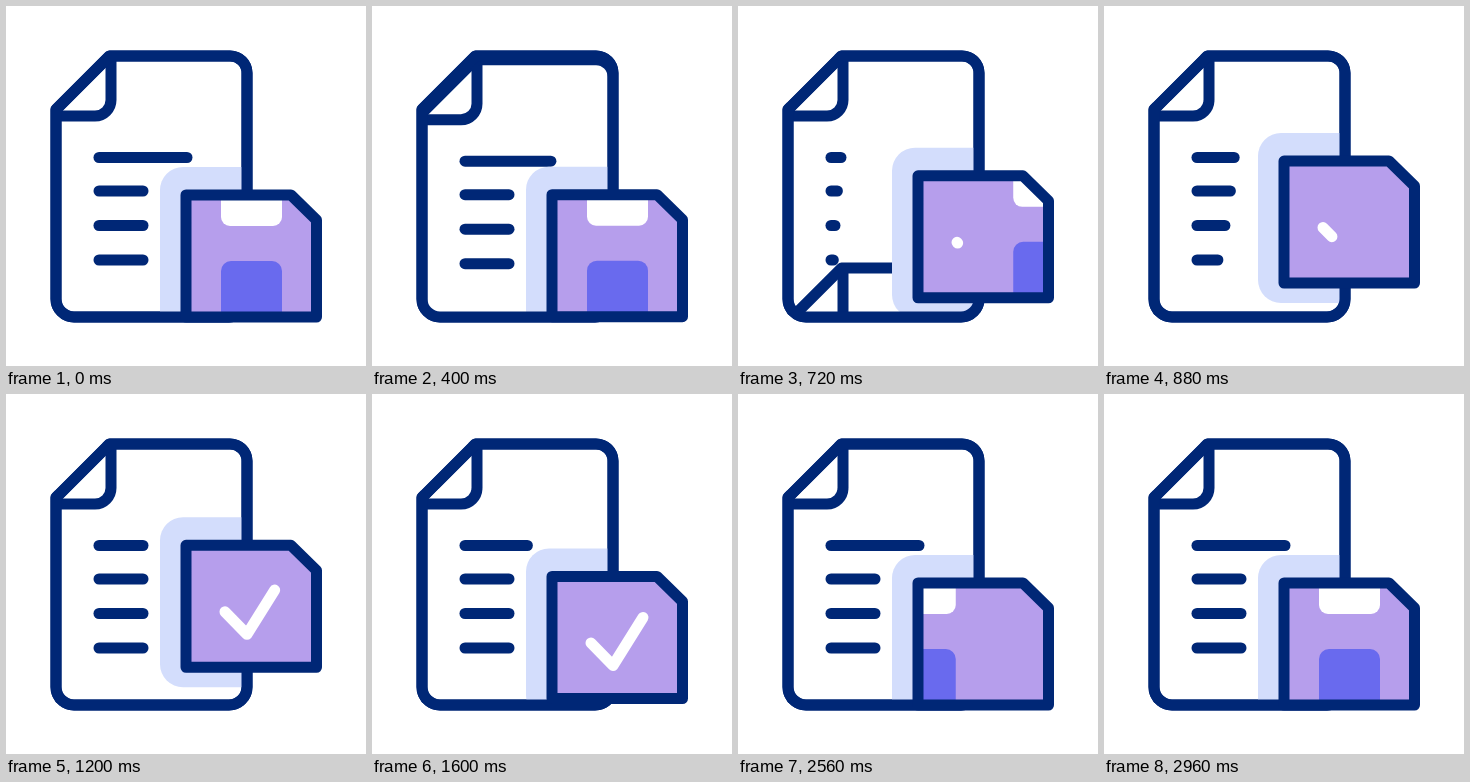
Animation of 360x360 px, one loop 3000 ms. Source, as an HTML page:

```html
<!DOCTYPE html>
<html lang="en">
<head>
<meta charset="utf-8">
<title>Save document</title>
<style>
  html, body { margin: 0; width: 100%; height: 100%; overflow: hidden; background: #fff; }
  svg { display: block; width: 100vw; height: 100vh; }
  .ink { fill: none; stroke: #002776; stroke-width: 11; stroke-linecap: round; stroke-linejoin: round; }
  .paper { fill: #fff; }
</style>
</head>
<body>
<svg viewBox="0 0 360 360">
  <defs>
    <path id="sheet" d="M50 103.500L103.500 50H224a17 17 0 0 1 17 17V293a18 18 0 0 1-18 18H68a18 18 0 0 1-18-18Z"/>
    <path id="fold" d="M105 52V94a16 16 0 0 1-16 16H52"/>
    <path id="disk" d="M180 0H285L310.500 25V122H180Z"/>
    <clipPath id="inSheet"><use href="#sheet"/></clipPath>
    <clipPath id="inDisk"><use href="#disk"/></clipPath>
  </defs>

  <g class="page"></g>
  <g clip-path="url(#inSheet)">
    <g class="page" id="cover"></g>
    <rect id="shade" x="154" width="120" height="170" rx="23" fill="#d3ddfc"/>
  </g>
  <use href="#sheet" class="ink"/>

  <g id="floppy">
    <use href="#disk" fill="#b69eec"/>
    <g clip-path="url(#inDisk)">
      <g id="parts">
        <rect x="215" y="-20" width="61" height="51" rx="9" fill="#fff"/>
        <rect x="215" y="66" width="61" height="80" rx="10" fill="#696aee"/>
      </g>
    </g>
    <path id="check" d="M219 66.500L241 89L271 41" fill="none" stroke="#fff" stroke-width="11"
          stroke-linecap="round" stroke-linejoin="round"/>
    <use href="#disk" class="ink"/>
  </g>
</svg>

<script>
const LOOP = 3000;
const LINE_X = 93, SHORT = 137, LONG = 181;
const LINE_Y = [151.5, 185, 219.5, 254];
const $ = id => document.getElementById(id);

const [under, cover] = [...document.querySelectorAll('.page')].map(page => {
  page.innerHTML =
    '<use href="#sheet" class="paper"/><use href="#fold" class="ink"/><use href="#sheet" class="ink"/>' +
    LINE_Y.map(y => `<line class="ink" x1="${LINE_X}" x2="${SHORT}" y1="${y}" y2="${y}"/>`).join('');
  return page.querySelectorAll('line');
});
const check = $('check');
const checkLen = check.getTotalLength();

// cubic-bezier(.667, 0, .333, 1)
function ease(x) {
  if (x <= 0) return 0;
  if (x >= 1) return 1;
  let lo = 0, hi = 1;
  for (let i = 0; i < 24; i++) {
    const s = (lo + hi) / 2, r = 1 - s;
    if (2 * r * r * s + r * s * s + s * s * s < x) lo = s; else hi = s;
  }
  return lo * lo * (3 - 2 * lo);
}

const ramp = (t, from, to) => ease((t - from) / (to - from));
const shift = (id, x, y) => $(id).setAttribute('transform', `translate(${x} ${y})`);

function draw(t) {
  // Old page slides away, new lines are written below it
  shift('cover', 0, 270 * ramp(t, 320, 970));
  cover[0].setAttribute('x2', LONG - (LONG - SHORT) * ramp(t, 320, 695));
  under.forEach((line, i) => {
    const start = 487 + 33 * i;
    let end = LINE_X + (SHORT - LINE_X) * ramp(t, start, start + 600);
    if (i === 0) end += (LONG - SHORT) * ramp(t, 1280, 1960);
    line.setAttribute('x2', end);
  });

  // Disk rises and settles again
  const y = 189 - 38 * (ramp(t, 320, 1120) - ramp(t, 1130, 1860));
  shift('floppy', 0, y);
  $('shade').setAttribute('y', y - 28);
  shift('parts', t < 1600 ? 100 * ramp(t, 400, 1000) : -100 * (1 - ramp(t, 2240, 2920)), 0);

  // Check mark draws on, then trims off from its start
  const head = checkLen * ramp(t, 640, 1360);
  const tail = checkLen * ramp(t, 1830, 2550);
  const len = head - tail;
  check.setAttribute('visibility', len > 0.3 ? 'visible' : 'hidden');
  check.setAttribute('stroke-dasharray', `${Math.max(len, 0.01)} 300`);
  check.setAttribute('stroke-dashoffset', -tail);
}

const t0 = performance.now();
function tick() {
  draw((performance.now() - t0) % LOOP);
  requestAnimationFrame(tick);
}
draw(0);
requestAnimationFrame(tick);
</script>
</body>
</html>
```
